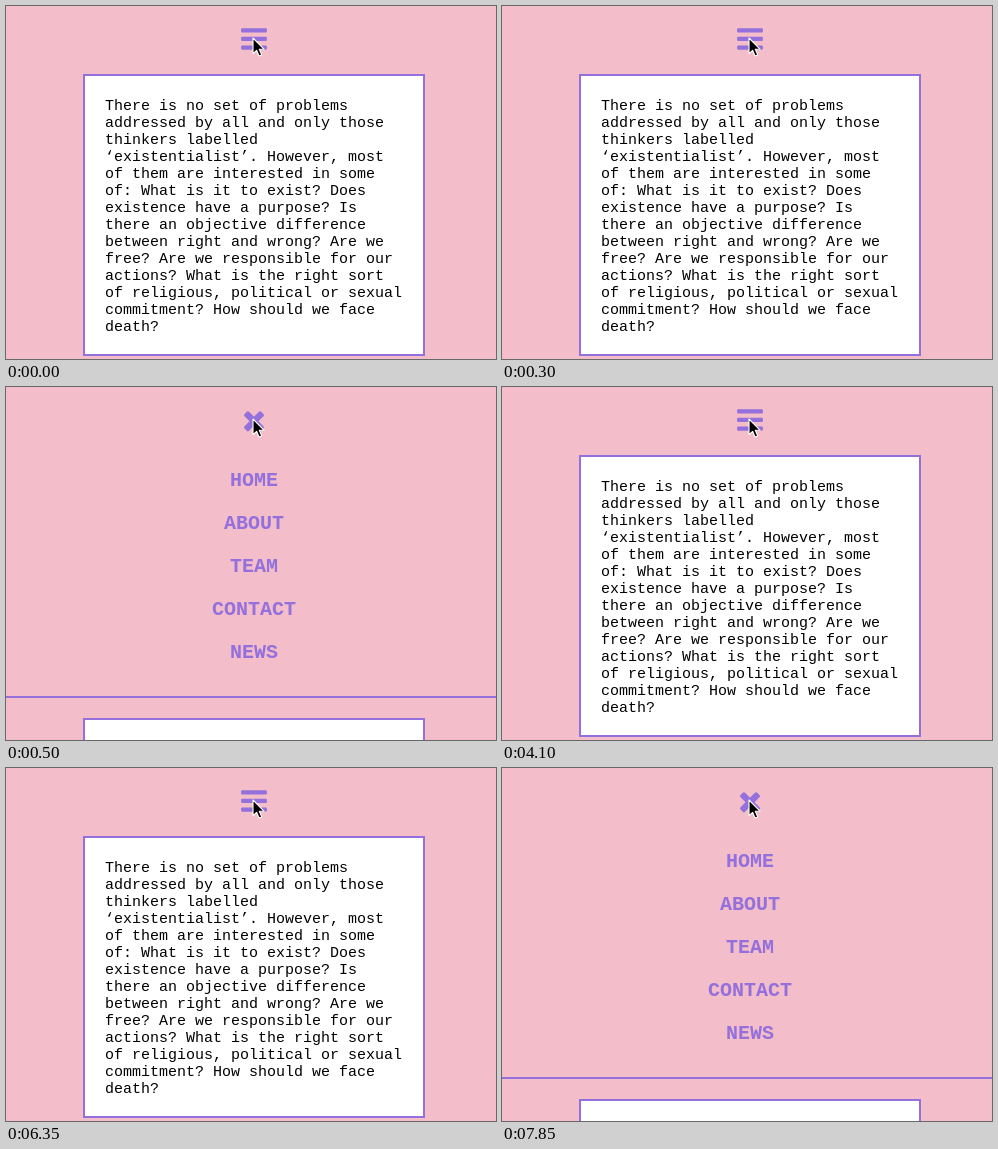
Animation, 490 px wide and 353 px high, one loop 8000 ms. Source, as an HTML page:

```html
<!DOCTYPE html>
<html lang="en">
<head>
<meta charset="utf-8">
<title>Toggle menu</title>
<style>
  html, body { margin: 0; width: 100%; height: 100%; overflow: hidden; background: #f3bdc9; }
  svg { display: block; width: 100%; height: 100%; }
  text { font-family: "Liberation Mono", "Courier New", monospace; }
  .accent { fill: #9370db; }
  .copy { font-size: 15px; fill: #000; }
  .link { font-size: 20px; font-weight: bold; text-anchor: middle; }
</style>
</head>
<body>
<svg viewBox="0 0 490 353">
  <rect width="490" height="353" fill="#f3bdc9"/>
  <g id="bars" class="accent"></g>
  <g id="menu" class="accent">
    <g transform="translate(248 34.3)">
      <rect x="-11.8" y="-3.2" width="23.6" height="6.4" rx="1.6" transform="rotate(45)"/>
      <rect x="-11.8" y="-3.2" width="23.6" height="6.4" rx="1.6" transform="rotate(-45)"/>
    </g>
    <rect y="309" width="490" height="2"/>
  </g>
  <g id="card">
    <rect x="78" y="69" width="340" height="280" fill="#fff" stroke="#9370db" stroke-width="2"/>
  </g>
  <path d="M247 32V47.6L250.6 44.3L253 50L255.7 48.9L253.3 43.3H258.2Z"
        fill="#000" stroke="#fff" stroke-width="1.1" stroke-linejoin="round"/>
</svg>
<script>
const LOOP = 8000;
const TOGGLES = [500, 4100, 7850];
const COPY = [
  "There is no set of problems",
  "addressed by all and only those",
  "thinkers labelled",
  "‘existentialist’. However, most",
  "of them are interested in some",
  "of: What is it to exist? Does",
  "existence have a purpose? Is",
  "there an objective difference",
  "between right and wrong? Are we",
  "free? Are we responsible for our",
  "actions? What is the right sort",
  "of religious, political or sexual",
  "commitment? How should we face",
  "death?"
];
const LINKS = ["HOME", "ABOUT", "TEAM", "CONTACT", "NEWS"];

const [bars, menu, card] = ["bars", "menu", "card"].map(id => document.getElementById(id));

function add(parent, tag, attrs, text = "") {
  const el = document.createElementNS("http://www.w3.org/2000/svg", tag);
  for (const key in attrs) el.setAttribute(key, attrs[key]);
  el.textContent = text;
  parent.append(el);
}

for (let i = 0; i < 3; i++) {
  add(bars, "rect", { x: 235.1, y: 22.2 + i * 8.6, width: 25.8, height: 4.3, rx: 1.1 });
}
LINKS.forEach((word, i) => add(menu, "text", { class: "link", x: 248, y: 99 + i * 43 }, word));
COPY.forEach((line, i) => add(card, "text", { class: "copy", x: 99, y: 104 + i * 17 }, line));

function draw(ms) {
  const t = ms % LOOP;
  const open = TOGGLES.filter(at => t >= at).length % 2 === 1;
  bars.setAttribute("visibility", open ? "hidden" : "visible");
  menu.setAttribute("visibility", open ? "visible" : "hidden");
  card.setAttribute("transform", `translate(0 ${open ? 263 : 0})`);
}

const start = performance.now();
function tick() {
  draw(performance.now() - start);
  requestAnimationFrame(tick);
}
tick();
</script>
</body>
</html>
```
